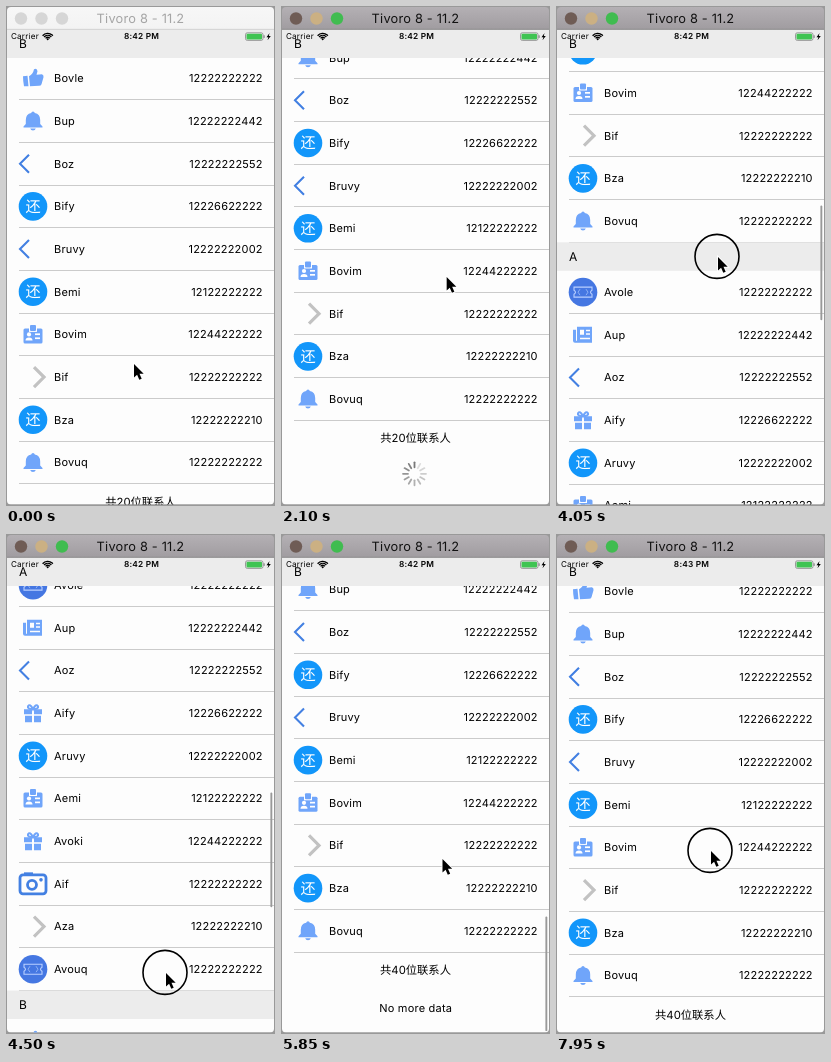
Animation of 269 by 500 pixels, one loop 8.1 s. Source, as an HTML page with a canvas:

```html
<!DOCTYPE html>
<html lang="en">
<head>
<meta charset="utf-8">
<style>
html, body { margin: 0; width: 100%; height: 100%; overflow: hidden; background: #999; }
canvas { display: block; width: 269px; height: 500px; }
</style>
</head>
<body>
<canvas id="stage"></canvas>
<script>
const canvas = document.getElementById('stage');
const ratio = window.devicePixelRatio || 1;
canvas.width = 269 * ratio;
canvas.height = 500 * ratio;
const ctx = canvas.getContext('2d');
ctx.scale(ratio, ratio);
ctx.textRendering = 'geometricPrecision';

const LOOP = 8100, STEP = 150, LOADED_AT = 3300;
const TOP = 23.5, BOTTOM = 498.5, ROW = 42.67, HEAD = 28.5;
const SECTION = HEAD + ROW * 10;
const FONT = 'Inter, "Noto Sans CJK SC", "Noto Sans CJK", sans-serif';
const LIGHT = '#70a5fa', BLUE = '#4380e2';

const groups = {
  A: {
    names: 'Avole Aup Aoz Aify Aruvy Aemi Avoki Aif Aza Avouq'.split(' '),
    icons: 'ticket news back gift repay card gift camera next ticket'.split(' ')
  },
  B: {
    names: 'Bovle Bup Boz Bify Bruvy Bemi Bovim Bif Bza Bovuq'.split(' '),
    icons: 'thumb bell back repay back repay card next repay bell'.split(' ')
  }
};
const phones = ['12222222222', '12222222442', '12222222552', '12226622222', '12222222002',
  '12122222222', '12244222222', '12222222222', '12222222210', '12222222222'];

// [time, y of the last row in the second section]
const scrollKeys = [[0, 456.4], [450, 456.4], [750, 400], [1050, 356], [1200, 353.2], [1350, 352],
  [1650, 393], [3750, 393], [4050, 215], [4500, -20], [4650, -85], [4950, -300], [5250, -500],
  [5400, -526], [5700, -513.6], [6600, -513.6], [6900, -521.6], [7200, -469]];
// [time, x, y]
const cursorKeys = [[0, 127, 357], [300, 150, 322], [450, 150, 320], [1050, 161, 180], [1200, 161, 174],
  [1350, 161, 172], [1800, 165, 250], [2700, 164, 310], [3450, 162, 312], [3600, 160, 430],
  [3750, 159, 440], [4050, 161, 250], [4350, 159, 440], [4500, 159, 438], [4950, 163, 230],
  [5250, 161, 322], [5850, 160.5, 324], [6450, 153, 340], [6900, 152, 320], [7200, 153, 368],
  [7800, 154, 318], [7950, 154, 316]];
const presses = [[450, 1350], [3750, 4100], [4500, 5000], [6600, 7300], [7800, LOOP]];
const barTimes = [[450, 2000], [3700, 6200], [6600, 7600]];

const within = (spans, t) => spans.some(([from, to]) => t >= from && t < to);

function at(keys, t, column = 1) {
  const i = keys.findIndex(key => key[0] > t);
  if (i < 0) return keys[keys.length - 1][column];
  const a = keys[i - 1], b = keys[i];
  return a[column] + (b[column] - a[column]) * (t - a[0]) / (b[0] - a[0]);
}

function text(value, x, y, size = 11, align = 'left', color = '#000', weight = 400, tracking = 0.2) {
  ctx.font = `${weight} ${size}px ${FONT}`;
  ctx.letterSpacing = `${tracking}px`;
  ctx.textAlign = align;
  ctx.textBaseline = 'alphabetic';
  ctx.fillStyle = color;
  ctx.fillText(value, x, y + size * 0.36);
}

function rect(x, y, w, h, color) {
  ctx.fillStyle = color;
  ctx.fillRect(x, y, w, h);
}

function pill(x, y, w, h, r, color) {
  ctx.beginPath();
  ctx.roundRect(x, y, w, h, r);
  ctx.fillStyle = color;
  ctx.fill();
}

function disc(x, y, r, color) {
  ctx.beginPath();
  ctx.arc(x, y, r, 0, Math.PI * 2);
  ctx.fillStyle = color;
  ctx.fill();
}

function ring(x, y, r, color, width) {
  ctx.beginPath();
  ctx.arc(x, y, r, 0, Math.PI * 2);
  ctx.strokeStyle = color;
  ctx.lineWidth = width;
  ctx.stroke();
}

function frame(x, y, w, h, r, color, width) {
  ctx.beginPath();
  ctx.roundRect(x, y, w, h, r);
  ctx.strokeStyle = color;
  ctx.lineWidth = width;
  ctx.stroke();
}

function fill(path, color) {
  ctx.fillStyle = color;
  ctx.fill(new Path2D(path), 'evenodd');
}

function line(path, color, width) {
  ctx.strokeStyle = color;
  ctx.lineWidth = width;
  ctx.stroke(new Path2D(path));
}

const icons = {
  thumb() {
    fill('M-10-2L-5.5-2.5L-4.5 8H-9Q-10 3-10-2ZM-4-2Q0-4 1-9Q4-11 4.5-7L3.5-3.5L9-4Q11-3 10.5-1' +
      'L8.5 6Q8 7.5 6 7.5L-3 8Z', LIGHT);
  },
  bell() {
    fill('M0-9.5Q1.5-9.5 1.8-8Q7.2-7 7.2-1V3L9.5 5.5V6.5H-9.5V5.5L-7.2 3V-1Q-7.2-7-1.8-8Q-1.5-9.5 0-9.5Z' +
      'M-2.8 7.5H2.8Q2.2 9.5 0 9.5Q-2.2 9.5-2.8 7.5Z', LIGHT);
  },
  back() { line('M-4-9L-13 0L-4 9', BLUE, 2.1); },
  next() { line('M1-10L11 0L1 10', '#c2c2c2', 3.2); },
  repay() {
    disc(0, 0, 14.3, '#1296fa');
    text('还', 0, 0, 15.2, 'center', '#fff', 300, 0);
  },
  card() {
    pill(-9.5, -6, 19, 15, 1.5, LIGHT);
    rect(-4, -7, 8, 4.5, '#fff');
    pill(-3, -9.5, 6, 6, 1, LIGHT);
    disc(-4, 0, 2.1, '#fff');
    fill('M-7.5 6Q-7.5 3-4 3Q-0.5 3-0.5 6Z', '#fff');
    rect(2, -1, 5, 1.7, '#fff');
    rect(2, 3, 5, 1.7, '#fff');
  },
  news() {
    fill('M-10-5H-7V6H-6V-8H9V8H-8Q-10 8-10 6ZM-3-5V0H1V-5ZM3-5V-3.5H7V-5ZM3-1.5V0H7V-1.5Z' +
      'M-3 3V4.5H7V3Z', LIGHT);
  },
  gift() {
    fill('M-9-4H-1V1H-9ZM1-4H9V1H1ZM-8 2.5H-1V9H-8ZM1 2.5H8V9H1Z', LIGHT);
    line('M0-4Q-6-4-5-7Q-3-10 0-4Q3-10 5-7Q6-4 0-4', LIGHT, 2);
  },
  camera() {
    frame(-13, -9, 26, 19, 3, BLUE, 2.8);
    ring(-1, 1, 4.5, BLUE, 2.8);
    rect(-9, -11.5, 9, 3, BLUE);
    disc(8, -4, 1.8, BLUE);
  },
  ticket() {
    disc(0, 0, 14.3, '#4577e2');
    line('M-9-5H9V-2Q6 0 9 2V5H-9V2Q-6 0-9-2Z', '#b9d0ff', 1.1);
    line('M-3-3L-5 0L-3 3M3-3L5 0L3 3', '#8fb2f6', 1);
  }
};

function drawRow(group, i, y) {
  ctx.save();
  ctx.translate(27, y);
  icons[group.icons[i]]();
  ctx.restore();
  text(group.names[i], 48, y);
  text(phones[i], 256.7, y, 11, 'right');
  rect(13, Math.round(y + ROW / 2 - 0.5), 255, 1, '#cbcbcb');
}

function drawSpinner(x, y, t) {
  const lead = Math.floor(t / 1000 * 12);
  ctx.lineCap = 'round';
  for (let i = 0; i < 12; i++) {
    const shade = 0.12 + 0.4 * (((i - lead) % 12 + 12) % 12) / 11;
    ctx.save();
    ctx.translate(x, y);
    ctx.rotate(i * Math.PI / 6);
    line('M0-6.5V-11.5', `rgba(0,0,0,${shade})`, 1.8);
    ctx.restore();
  }
  ctx.lineCap = 'butt';
}

function drawTable(t) {
  const loaded = t >= LOADED_AT;
  const last = at(scrollKeys, t);
  const start = last + ROW / 2 - SECTION * 2;
  const letters = loaded ? ['A', 'B', 'A', 'B'] : ['A', 'B'];

  letters.forEach((letter, s) => {
    const top = start + s * SECTION;
    if (top > BOTTOM || top + SECTION < TOP) return;
    for (let i = 0; i < 10; i++) {
      const y = top + HEAD + ROW * (i + 0.5);
      if (y > 0 && y < 525) drawRow(groups[letter], i, y);
    }
    const y = Math.min(Math.max(top, TOP), top + SECTION - HEAD);
    rect(1, y, 267, HEAD, '#ececec');
    text(letter, 13, y + HEAD / 2, 12);
  });

  const end = start + letters.length * SECTION;
  text(`共${letters.length * 10}位联系人`, 134.5, end + 17.7, 11.3, 'center', '#000', 400, 0);
  if (loaded) text('No more data', 134.7, end + 55.5, 11, 'center');
  else if (t >= 600) drawSpinner(133.5, end + 53.5, t);

  if (within(barTimes, t)) {
    const view = BOTTOM - TOP, offset = TOP - start, max = loaded ? 1428 : 520;
    const length = view * view / (max + view) - 4 - Math.max(0, offset - max);
    const y = TOP + 1 + Math.min(1, offset / max) * (view - 2 - length);
    pill(264.4, y, 1.9, length, 0.9, '#999');
  }
}

function drawStatus(t) {
  text('Carrier', 5, 30.5, 8.1);
  text(t >= 7500 ? '8:43 PM' : '8:42 PM', 135.5, 30.5, 8.3, 'center', '#000', 600);
  for (const r of [2.8, 4.8, 6.8]) {
    ctx.beginPath();
    ctx.arc(41.7, 34.2, r, -Math.PI * 0.77, -Math.PI * 0.23);
    ctx.strokeStyle = '#000';
    ctx.lineWidth = 1.4;
    ctx.stroke();
  }
  disc(41.7, 33.3, 1, '#000');
  frame(239.5, 26.8, 17.5, 7.6, 1.8, '#777', 0.7);
  pill(240.5, 27.8, 15.5, 5.6, 1, '#3fc452');
  rect(257.6, 29.3, 1, 2.6, '#777');
  fill('M263.5 27L260.5 31.2H262.4L261.5 34.3L264.8 30H262.8Z', '#000');
}

function drawTitle(active) {
  const shade = ctx.createLinearGradient(0, 1, 0, TOP);
  shade.addColorStop(0, active ? '#b4b0b4' : '#f7f7f7');
  shade.addColorStop(1, active ? '#a09ca0' : '#f3f3f3');
  pill(1, 1, 267, TOP - 1, [4, 4, 0, 0], shade);
  rect(1, TOP - 0.7, 267, 0.7, active ? '#888' : '#d4d4d4');
  const lights = active ? ['#6f5c55', '#cbb083', '#40bc50'] : ['#d6d6d6', '#d6d6d6', '#d6d6d6'];
  lights.forEach((color, i) => disc(15 + i * 20.5, 12.5, 6.2, color));
  text('Tivoro 8 - 11.2', 134.5, 12.5, 12.8, 'center', active ? '#111' : '#a5a5a5');
}

function drawCursor(t) {
  const x = at(cursorKeys, t, 1), y = at(cursorKeys, t, 2);
  if (within(presses, t)) ring(x, y + 0.4, 22, '#000', 1.6);
  ctx.save();
  ctx.translate(x + 1, y + 1);
  const arrow = 'M0 0V13.5L3.1 10.7L5.3 15.8L7.7 14.8L5.5 9.8H9.7Z';
  line(arrow, '#fff', 1.8);
  fill(arrow, '#000');
  ctx.restore();
}

function draw(now) {
  const t = Math.floor(now % LOOP / STEP) * STEP;
  rect(0, 0, 269, 500, '#999');
  ctx.save();
  ctx.beginPath();
  ctx.roundRect(1, TOP, 267, BOTTOM - TOP, [0, 0, 4, 4]);
  ctx.clip();
  rect(1, TOP, 267, BOTTOM - TOP, '#fdfdfd');
  drawTable(t);
  drawStatus(t);
  ctx.restore();
  drawTitle(t >= 300);
  drawCursor(t);
}

let began;
function tick(now) {
  began ??= now;
  draw(now - began);
  requestAnimationFrame(tick);
}
draw(0);
requestAnimationFrame(tick);
</script>
</body>
</html>
```
